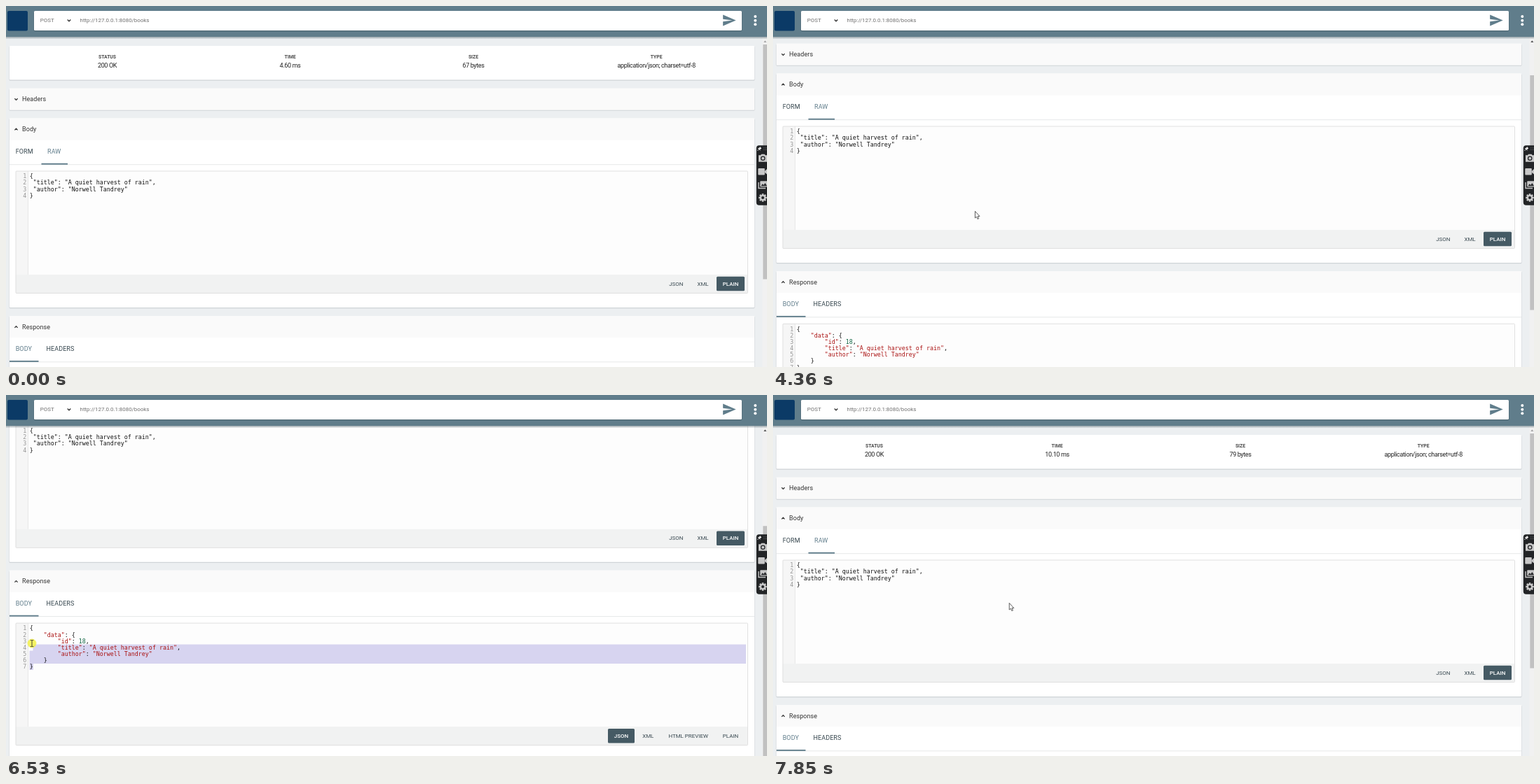
Animation, 1086 px wide and 516 px high, one loop 8000 ms. Source, as an HTML page:

```html
<!DOCTYPE html>
<html lang="en">
<head>
<meta charset="utf-8">
<title>REST client</title>
<style>
html, body { margin: 0; width: 100%; height: 100%; overflow: hidden; background: #eceff1; }
svg { display: block; width: 1086px; height: 516px; }
text { font-family: Roboto, Arial, sans-serif; white-space: pre; }
.ui { font-size: 9px; letter-spacing: .08px; fill: #333; }
.small { font-size: 7.95px; fill: #37474f; }
.url { font-size: 7.9px; fill: #707070; }
.label { font-size: 6.8px; font-weight: 700; fill: #4a4a4a; }
.value { font-size: 9px; letter-spacing: -.36px; fill: #222; }
.code { font: 8.32px "DejaVu Sans Mono", monospace; fill: #111; }
.num { fill: #999; }
.str { fill: #a11; }
.digit { fill: #164; }
</style>
</head>
<body>
<svg id="stage" viewBox="0 0 1086 516"></svg>
<script>
const LOOP = 8000;
const PITCH = 9.15;
const BLUE = '#607d8b';
const TITLE = 'A quiet harvest of rain';
const AUTHOR = 'Norwell Tandrey';

const request = ['{', ` "title": "${TITLE}",`, ` "author": "${AUTHOR}"`, '}'];
const response = ['{', '    "data": {', '        "id": 18,', `        "title": "${TITLE}",`,
  `        "author": "${AUTHOR}"`, '    }', '}'];

const rect = (x, y, w, h, fill, extra = '') =>
  `<rect x="${x}" y="${y}" width="${w}" height="${h}" fill="${fill}" ${extra}/>`;
const text = (x, y, cls, str, extra = '') =>
  `<text x="${x}" y="${y}" class="${cls}" ${extra}>${str}</text>`;
const mid = 'text-anchor="middle"';

const chevron = (x, y, up, size = 2.1, color = '#333') => {
  const d = up ? -size / 2 : size / 2;
  return `<path d="M${x - size} ${y - d}L${x} ${y + d}L${x + size} ${y - d}" fill="none" stroke="${color}" stroke-width="1.3"/>`;
};

const card = (y, h) =>
  rect(4.5, y + .5, 1064, h + .8, '#cfd4d7', 'rx="1.5"') + rect(5, y, 1063, h, '#fff', 'rx="1"');

const cardHead = (y, name, up) =>
  rect(5, y, 1063, 31, '#fafafa') + chevron(14.5, y + 15.8, up) + text(23, y + 18.7, 'ui', name);

function tabs(y, names, active, x, w) {
  const labels = names.map(([tx, name], i) =>
    text(tx, y, 'ui', name, `style="fill:${i === active ? BLUE : '#37474f'}"`));
  return labels.join('') + rect(5, y + 15, 1063, 1, '#e6e8e9') + rect(x, y + 13.6, w, 1.9, BLUE);
}

const paint = line => line.replace(/"[^"]*"|\d+/g, s =>
  `<tspan class="${s[0] === '"' ? 'str' : 'digit'}">${s}</tspan>`);

function editor(y, lines, colored, buttons, selection = '') {
  let out = rect(14, y, 1044.5, 174.5, '#fdfdfd') + rect(14, y, 17, 148, '#f6f6f6')
    + rect(31, y, .7, 148, '#ddd') + rect(14, y + 148, 1044.5, 26.5, '#f1f2f2')
    + rect(14, y, 1044.5, 174.5, 'none', 'stroke="#ddd" stroke-width=".9" rx="1"') + selection;
  lines.forEach((line, i) => {
    const by = y + 10.3 + i * PITCH;
    out += text(29.3, by, 'code num', i + 1, 'text-anchor="end"')
      + text(33.7, by, 'code', colored ? paint(line) : line);
  });
  buttons.forEach(([x, name, w]) => {
    if (w) out += rect(x - w / 2, y + 150.8, w, 20.5, '#455a64', 'rx="1.5"');
    out += text(x, y + 163.6, 'small', name, mid + (w ? ' style="fill:#fff;font-weight:500"' : ''));
  });
  return out;
}

const stat = (x, label, value, id) =>
  text(x, 75.4, 'label', label, mid) + text(x, 88, 'value', value, `${mid} id="${id}"`);

const page = card(57, 48.5)
  + stat(144.5, 'STATUS', '200 OK', 'status') + stat(405.5, 'TIME', '', 'time')
  + stat(667, 'SIZE', '', 'size') + stat(928.2, 'TYPE', 'application/json; charset=utf-8', 'type')
  + card(118, 30.5) + cardHead(117.5, 'Headers', false)
  + card(160.5, 270.5) + cardHead(160.5, 'Body', true)
  + tabs(211.2, [[13.7, 'FORM'], [59, 'RAW']], 1, 50.5, 37.5)
  + editor(236, request, false, [[956.3, 'JSON'], [994.5, 'XML'], [1034, 'PLAIN', 40]])
  + card(443, 270) + cardHead(443, 'Response', true)
  + tabs(493.3, [[13.7, 'BODY'], [57.5, 'HEADERS']], 0, 5, 41.5)
  + editor(518.3, response, true,
    [[878, 'JSON', 38], [916.3, 'XML'], [973.7, 'HTML PREVIEW'], [1034, 'PLAIN']], '<path id="sel" fill="#d7d4f0"/>')
  + rect(39, 576, .8, 9.2, '#222', 'id="caret"');

const scrollbar = rect(1079.3, 44, 7, 472, '#f1f1f1')
  + '<path id="up" d="M1081.3 52L1083.3 49.3L1085.3 52Z"/>'
  + rect(1080.3, 55, 6, 335.5, '#c1c1c1', 'id="thumb"');

const topBar = rect(0, 0, 1086, 47.5, 'url(#shade)') + rect(0, 0, 1086, 44, BLUE)
  + rect(2, 7, 29, 28.5, '#0b3a66', 'rx="2"')
  + rect(39.5, 7.6, 1011, 28.6, '#4d6874', 'rx="2"') + rect(40, 7, 1010, 28, '#fff', 'rx="1.5"')
  + text(48.8, 23.4, 'url', 'POST') + chevron(90, 20.6, false, 2.3)
  + text(105.6, 23.4, 'url', 'http://127.0.0.1:8080/books')
  + rect(1018, 10, 29, 23, '#e0e2e3', 'rx="1.5" id="hover"')
  + `<path transform="translate(1021.4 9.9) scale(.88)" d="M2 21L23 12L2 3V10L17 12L2 14Z" fill="${BLUE}"/>`
  + [15, 20.7, 26.3].map(y => `<circle cx="1069.3" cy="${y}" r="2" fill="#fff"/>`).join('');

const teeth = [0, 45, 90, 135].map(a =>
  rect(-1.3, -5.8, 2.6, 11.6, '#c8c8c8', `transform="rotate(${a})"`)).join('');
const dots = [0, 1, 2, 3, 4, 5].map(i =>
  rect(1081 + (i % 3) * 2, 202.5 + (i > 2) * 2.5, .8, .8, '#888')).join('');

const dock = rect(1070.8, 199.3, 22, 85.5, '#222426', 'rx="4"')
  + '<path d="M1072.5 206.8L1074.6 204.6M1073 203L1076.4 206.4M1074.5 203.8L1076 201.7L1077.8 203.4L1075.6 205Z" stroke="#eee" fill="#eee"/>' + dots
  + '<g fill="#c8c8c8">'
  + '<path d="M1074 213.3H1077L1078 211.8H1082.5L1083.5 213.3H1087V222.7H1074Z"/>'
  + '<circle cx="1080.2" cy="217.8" r="3.3" fill="#222426"/><circle cx="1080.2" cy="217.8" r="2"/>'
  + rect(1073.3, 232, 9.5, 9.5, '#c8c8c8', 'rx="1"') + '<path d="M1082.8 236L1086 233V240.5L1082.8 238Z"/>'
  + '<path d="M1074 252V260.5H1084" fill="none" stroke="#c8c8c8" stroke-width="1.4"/>'
  + rect(1076.2, 250.3, 11, 8.3, '#c8c8c8', 'rx="1"')
  + '<path d="M1077.5 257.3L1079.6 254.2L1081.3 256L1083.3 253L1086 257.3Z" fill="#222426"/></g>'
  + `<g transform="translate(1080 274)">${teeth}<circle r="4.3" fill="#c8c8c8"/><circle r="2" fill="#222426"/></g>`;

const pointers = '<g id="pointer"><circle id="halo" r="6.4" fill="#f3f03c" fill-opacity=".8"/>'
  + '<path id="arrow" d="M.4 .4V10L2.5 8.2L4 11.5L5.6 10.8L4.2 7.6H7Z" fill="#fff" stroke="#333" stroke-width=".8"/>'
  + '<path id="hand" d="M-1 1Q0 -.6 1 1V5Q2 4.2 2.9 5.3Q4 4.6 4.7 5.8Q6 5.3 6.3 6.8V10Q6 12 5 13.6H-.4Q-2 11 -3.6 8.4Q-3.3 7 -1.7 8L-1 8.6Z" fill="#fff" stroke="#222" stroke-width=".9"/>'
  + '<path id="beam" d="M-2.2 -4.5H-.5L0 -4L.5 -4.5H2.2M0 -4V4M-2.2 4.5H-.5L0 4L.5 4.5H2.2" fill="none" stroke="#333" stroke-width=".9"/></g>';

const stage = document.getElementById('stage');
stage.innerHTML = '<defs><linearGradient id="shade" x1="0" y1="0" x2="0" y2="1">'
  + '<stop offset=".92" stop-color="#455a64" stop-opacity=".55"/><stop offset="1" stop-color="#455a64" stop-opacity="0"/></linearGradient></defs>'
  + rect(0, 0, 1086, 516, '#eceff1') + `<g id="page">${page}</g>` + scrollbar + topBar + dock + pointers;

const el = {};
stage.querySelectorAll('[id]').forEach(node => el[node.id] = node);
const show = (node, on) => node.setAttribute('display', on ? 'inline' : 'none');

// time, scroll, pointer, x, y, first selected line, its left edge
const steps = [
  [0, 0],
  [660, 0, 'arrow', 1074, 503], [870, 0, 'arrow', 1066, 400], [1090, 0, 'arrow', 1050, 270],
  [1300, 0, 'arrow', 1024, 150], [1510, 0, 'arrow', 1002, 73],
  [1730, 0, 'hand', 1025, 24], [1950, 0, 'hand', 1029, 21], [2170, 0, 'hand', 1031.3, 19.3],
  [3930, 0, 'arrow', 880, 118], [4150, 0, 'arrow', 410, 262],
  [4360, 64, 'arrow', 288, 293], [4580, 128, 'arrow', 285, 296],
  [5010, 186.7, 'arrow', 282, 297.5], [5240, 192.2, 'arrow', 246, 306],
  [5450, 192.2, 'beam', 145, 348], [5660, 192.2, 'beam', 72, 378], [5880, 192.2, 'beam', 43.5, 388.5],
  [6080, 192.2, 'beam', 43.5, 388.5], [6300, 192.2, 'beam', 41, 375, 5, 41],
  [6520, 192.2, 'beam', 37, 355, 3, 38.5], [6740, 192.2, 'beam', 31, 334, 0, 33.5],
  [6970, 192.2, 'beam', 31, 334, 0, 33.5],
  [7180, 192.2, 'arrow', 286.8, 298, 0, 33.5], [7400, 128, 'arrow', 300, 298, 0, 33.5],
  [7630, 64, 'arrow', 322, 297, 0, 33.5], [7850, 0, 'arrow', 336.8, 297, 0, 33.5]
];

function selectionPath(line, x) {
  if (line === undefined) return '';
  const top = 521.2 + line * PITCH, last = 521.2 + 6 * PITCH;
  const body = top + PITCH;
  return `M${x} ${top}H1056V${last}H39V${last + PITCH}H33.5V${body}H${x}Z`;
}

function draw(t) {
  const [, scroll, kind, x, y, line, left] = steps.findLast(s => s[0] <= t);
  const done = t >= 3270;
  const pressed = t >= 6080 && t < 6970;

  el.page.setAttribute('transform', `translate(0 ${-scroll})`);
  el.thumb.setAttribute('y', 55 + scroll * .688);
  el.up.setAttribute('fill', scroll ? '#505050' : '#a3a3a3');
  el.time.textContent = done ? '10.10 ms' : '4.60 ms';
  el.size.textContent = done ? '79 bytes' : '67 bytes';

  show(el.hover, kind === 'hand');
  show(el.caret, t >= 6080 && t < 6300);
  el.sel.setAttribute('d', selectionPath(line, left));

  show(el.pointer, kind);
  if (kind) el.pointer.setAttribute('transform', `translate(${x} ${y})`);
  for (const name of ['arrow', 'hand', 'beam']) show(el[name], kind === name);
  show(el.halo, pressed);
}

let start;
function tick(now) {
  start ??= now;
  draw((now - start) % LOOP);
  requestAnimationFrame(tick);
}
draw(0);
requestAnimationFrame(tick);
</script>
</body>
</html>
```
